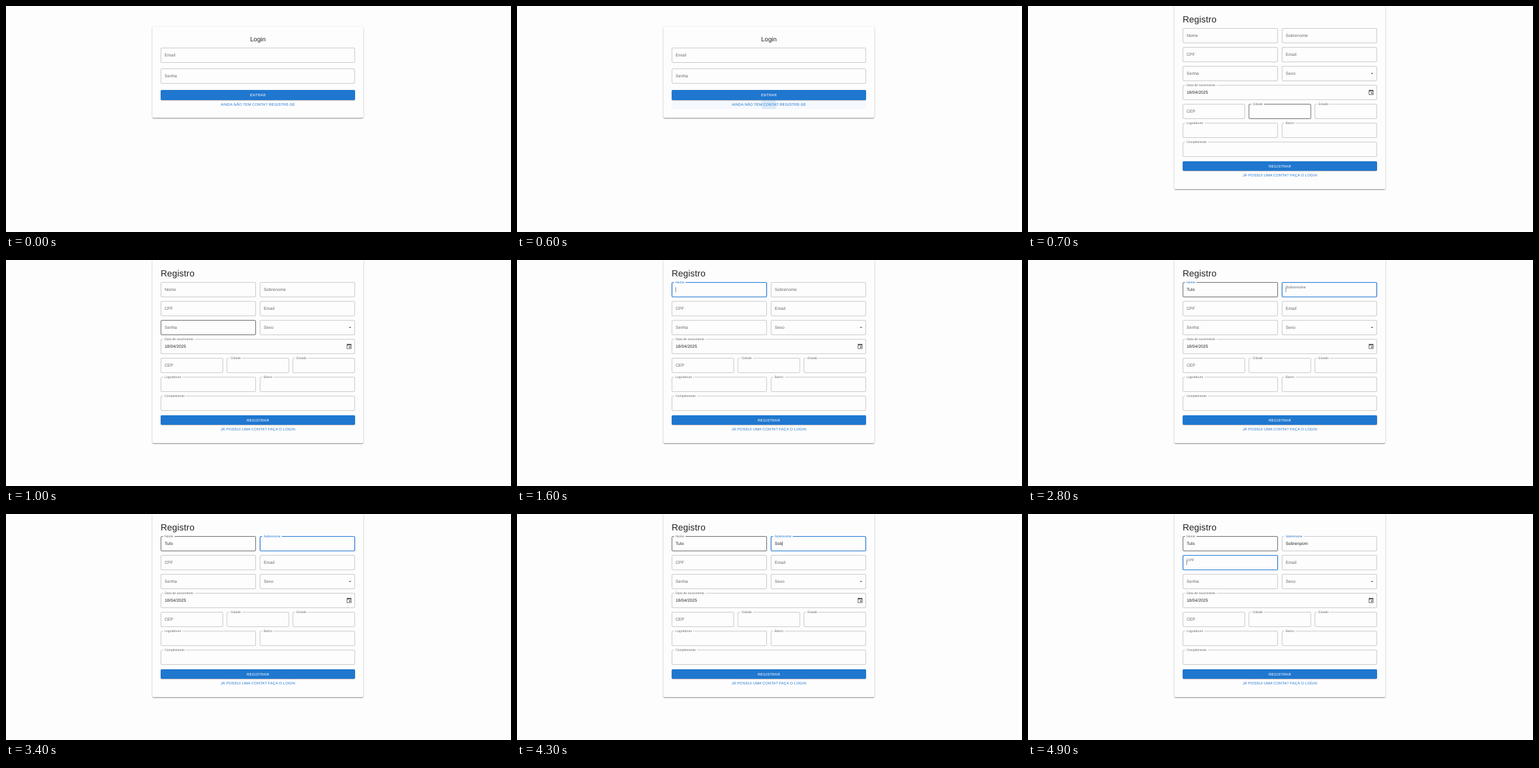
Recreate the animation shown at these times as an HTML page. Size 800 by 358 pixels, loop 5000 ms.

```html
<!DOCTYPE html>
<html lang="pt-BR">
<head>
<meta charset="utf-8">
<title>Login e registro</title>
<style>
  html, body { margin: 0; width: 100%; height: 100%; overflow: hidden; background: #fdfdfd; }
  .page { position: absolute; inset: 0; }
  .card, .button { position: absolute; box-sizing: border-box; }
  .card {
    left: 231.8px; width: 334.6px; border-radius: 1.7px; background: #fefdfe;
    box-shadow: 0 1.2px 1.3px -.8px rgba(0,0,0,.3), 0 1.2px 1.7px rgba(0,0,0,.2), 0 .4px 3.2px rgba(0,0,0,.15);
  }
  .button {
    left: 245px; width: 308px; height: 15.3px; border-radius: 1.7px; background: #1f77cf;
    box-shadow: 0 1.2px .5px -.8px rgba(0,0,0,.2), 0 .8px .8px rgba(0,0,0,.14), 0 .4px 2px rgba(0,0,0,.12);
  }
  svg { position: absolute; left: 0; top: 0; }
  text { font-family: "Liberation Sans", Arial, sans-serif; fill: rgba(0,0,0,.87); text-rendering: geometricPrecision; white-space: pre; }
  .input { font-size: 6.69px; letter-spacing: .00938em; }
  .action { font-size: 5.86px; letter-spacing: .02857em; text-anchor: middle; fill: #1f77cf; }
  .on-blue { fill: #fff; }
  .box { fill: none; }
  .notch { fill: #fefdfe; }
  .caret { fill: rgba(0,0,0,.7); }
</style>
</head>
<body>
<div class="page" id="login">
  <div class="card" style="top:33px;height:144px"></div>
  <div class="button" style="top:133.3px"></div>
  <svg width="800" height="358">
    <clipPath id="linkArea"><rect x="245" y="148.8" width="308" height="14.6" rx="1.7"/></clipPath>
    <g clip-path="url(#linkArea)" fill="#1976d2">
      <rect id="linkHover" x="245" y="148.8" width="308" height="14.6"/>
      <circle id="ripple" cx="399" cy="156.1" r="12.6" opacity=".11"/>
    </g>
    <text x="399" y="56.4" font-size="10.04" text-anchor="middle">Login</text>
    <text class="action on-blue" x="399" y="143">ENTRAR</text>
    <text class="action" x="399" y="158.2">AINDA NÃO TEM CONTA? REGISTRE-SE</text>
    <g class="fields"></g>
  </svg>
</div>
<div class="page" id="register">
  <div class="card" style="top:-1px;height:290.7px"></div>
  <div class="button" style="top:246px"></div>
  <svg width="800" height="358">
    <text x="245" y="26.2" font-size="14.2" letter-spacing=".1">Registro</text>
    <text class="action on-blue" x="399" y="255.6">REGISTRAR</text>
    <text class="action" x="399" y="270.4">JÁ POSSUI UMA CONTA? FAÇA O LOGIN</text>
    <g class="fields"></g>
    <path transform="translate(540 101.8) scale(.4184)" fill="rgba(0,0,0,.6)" d="M7 10l5 5 5-5z"/>
    <path transform="translate(538.5 132) scale(.4184)" fill="rgba(0,0,0,.7)" fill-rule="evenodd"
      d="M17 12h-5v5h5zM16 1v2H8V1H6v2H5a2 2 0 0 0-2 2v14a2 2 0 0 0 2 2h14a2 2 0 0 0 2-2V5a2 2 0 0 0-2-2h-1V1zM19 19H5V8h14z"/>
  </svg>
</div>
<script>
const LOOP = 5000, STEP = 100, FIELD_HEIGHT = 23, INSET = 6;
const LABEL_LEAD = 28, LABEL_TIME = 200;
const byId = id => document.getElementById(id);
const clamp = v => Math.max(0, Math.min(1, v));
const easeOut = p => 1 - (1 - p) ** 3;

function add(parent, tag, attrs, content = '') {
  const el = document.createElementNS('http://www.w3.org/2000/svg', tag);
  for (const key in attrs) el.setAttribute(key, attrs[key]);
  el.textContent = content;
  parent.append(el);
  return el;
}

function makeField(page, label, x, y, width, { value = '', floating = false } = {}) {
  const group = document.querySelector(`#${page} .fields`);
  const middle = y + FIELD_HEIGHT / 2;
  const box = add(group, 'rect', { class: 'box', x, y, width, height: FIELD_HEIGHT, rx: 1.5 });
  const notch = add(group, 'rect', { class: 'notch', x: x + 3.3, y: y - 1, height: 2 });
  const text = add(group, 'text', { class: 'input', x: x + INSET - .3, y: middle + 2.32 }, value);
  const caret = add(group, 'rect', { class: 'caret', y: middle - 4, width: .6, height: 8 });
  const title = add(group, 'text', { class: 'input', y: 2.32 }, label);
  const titleWidth = title.getComputedTextLength();
  notch.setAttribute('width', titleWidth * .75 + 4.6);

  return function draw({ lift = +floating, blue = 0, focused = false, hovered = false, typed = value, caretOn = false } = {}) {
    box.setAttribute('stroke', focused ? '#1f77cf' : hovered ? 'rgba(0,0,0,.68)' : 'rgba(0,0,0,.24)');
    box.setAttribute('stroke-width', focused ? 1.2 : .85);
    notch.style.display = lift > .5 ? '' : 'none';
    title.setAttribute('transform',
      `translate(${x + INSET - .3} ${middle - 11.7 * lift}) scale(${1 - .25 * lift})`);
    title.style.fill = `color-mix(in srgb, #1f77cf ${blue * 100}%, #686868)`;
    if (text.textContent !== typed) text.textContent = typed;
    caret.style.display = caretOn ? '' : 'none';
    caret.setAttribute('x', x + INSET - .2 + (typed ? text.getComputedTextLength() : 0));
  };
}

const row = i => 35.5 + 30 * i;
const FULL = 307, HALF = 150, THIRD = 98;
const LEFT = 245.5, RIGHT = 402.5;
const floating = true;

[['Email', 66.5], ['Senha', 99.5]].forEach(([label, y]) => makeField('login', label, LEFT, y, FULL)());

const fields = {};
[
  ['Nome', LEFT, 0, HALF], ['Sobrenome', RIGHT, 0, HALF],
  ['CPF', LEFT, 1, HALF], ['Email', RIGHT, 1, HALF],
  ['Senha', LEFT, 2, HALF], ['Sexo', RIGHT, 2, HALF],
  ['Data de nascimento', LEFT, 3, FULL, { floating, value: '18/04/2025' }],
  ['CEP', LEFT, 4, THIRD], ['Cidade', 350, 4, THIRD, { floating }], ['Estado', 454.5, 4, THIRD, { floating }],
  ['Logradouro', LEFT, 5, HALF, { floating }], ['Bairro', RIGHT, 5, HALF, { floating }],
  ['Complemento', LEFT, 6, FULL, { floating }],
].forEach(([label, x, i, width, options]) => {
  fields[label] = makeField('register', label, x, row(i), width, options);
  fields[label]();
});

// Each list holds [start time, state]; the latest started entry applies.
const at = (list, t, initial) => list.reduce((found, [time, state]) => t >= time ? state : found, initial);

const hoverPath = [[700, 'Cidade'], [900, 'Data de nascimento'], [1000, 'Senha'], [1100, 'CPF'], [1200, 'Nome']];
const caretBlink = [[1400, true], [1900, false], [2100, true], [3400, false], [4000, true]];
const typing = {
  Nome: { focus: 1400, blur: 2800, keys: [[2100, 'T'], [2300, 'Tu'], [2500, 'Tulo']] },
  Sobrenome: {
    focus: 2800, blur: 4900,
    keys: [[4000, 'S'], [4100, 'So'], [4300, 'Sob'], [4400, 'Sobre'], [4500, 'Sobren'], [4700, 'Sobrenpo'], [4800, 'Sobrenpom']],
  },
  CPF: { focus: 4900, blur: LOOP, keys: [] },
};

function fieldState(label, t) {
  const state = { hovered: at(hoverPath, t) === label };
  const entry = typing[label];
  if (!entry) return state;
  const progress = since => t < since ? 0 : clamp((t - since + LABEL_LEAD) / LABEL_TIME);
  const focused = t >= entry.focus && t < entry.blur;
  return {
    ...state,
    focused,
    lift: easeOut(progress(entry.focus)),
    blue: progress(entry.focus) - progress(entry.blur),
    typed: at(entry.keys, t, ''),
    caretOn: focused && at(caretBlink, t, false),
  };
}

function render(t) {
  const registering = t >= 700;
  byId('login').style.visibility = registering ? 'hidden' : 'visible';
  byId('register').style.visibility = registering ? 'visible' : 'hidden';
  byId('linkHover').setAttribute('opacity', .04 * easeOut(clamp((t - 150) / 250)));
  byId('ripple').style.display = t >= 600 ? '' : 'none';
  for (const label in fields) fields[label](fieldState(label, t));
}

const start = performance.now();
let shown = -1;
function tick() {
  const elapsed = (performance.now() - start) % LOOP;
  const t = Math.floor(elapsed / STEP) * STEP;
  if (t !== shown) render(shown = t);
  requestAnimationFrame(tick);
}
tick();
</script>
</body>
</html>
```
